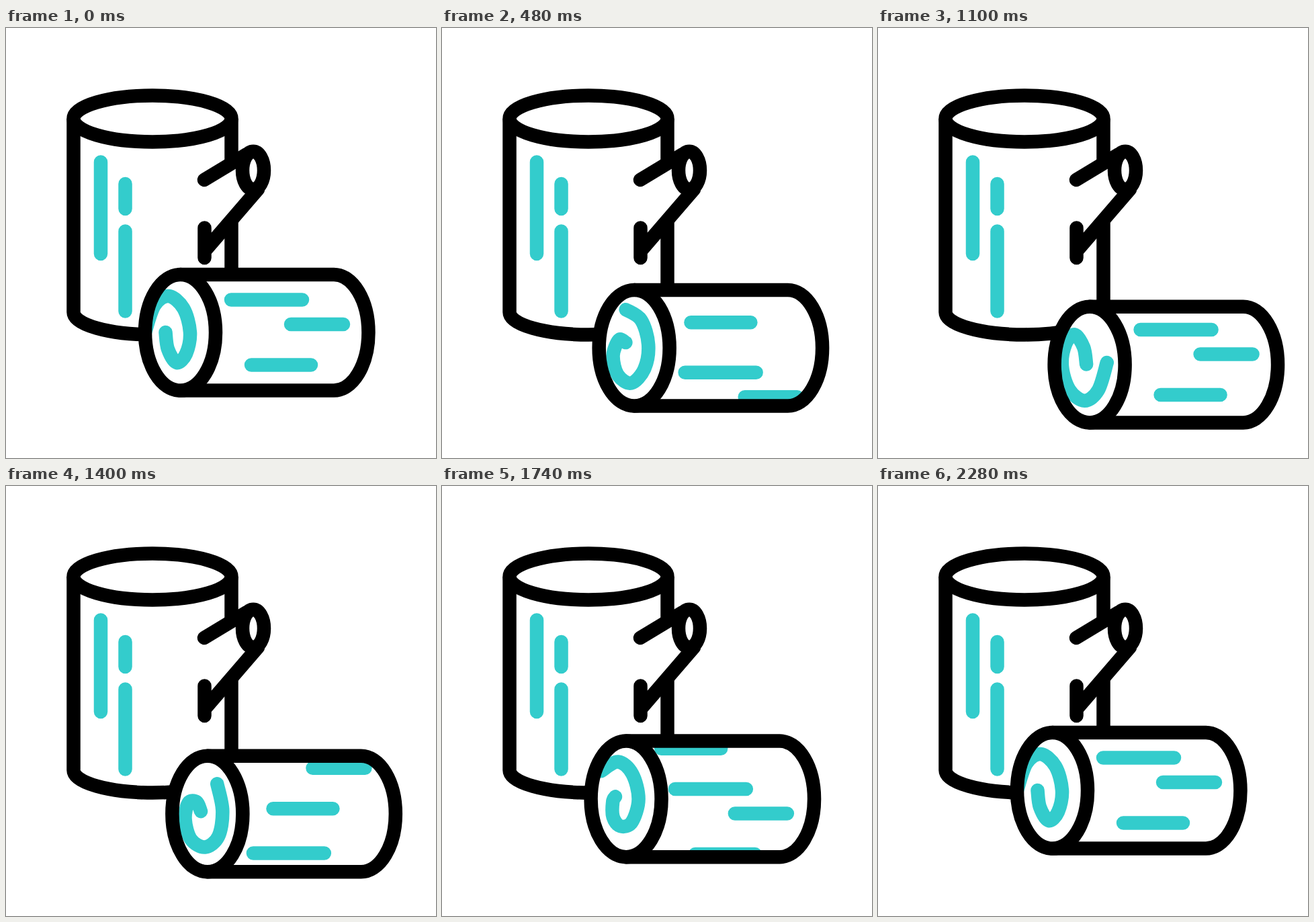
An HTML page that plays this animation: 640x640 px, repeating every 3000 ms.

```html
<!DOCTYPE html>
<html lang="en">
<head>
<meta charset="utf-8">
<title>Rolling log</title>
<style>
  html, body { margin: 0; width: 100%; height: 100%; overflow: hidden; background: #fff; }
  svg { display: block; width: 100vw; height: 100vh; }
  .ink { fill: none; stroke: #000; stroke-width: 20.5; stroke-linejoin: round; }
  .face { fill: #fff; }
  .bark { fill: none; stroke: #33cccc; stroke-width: 20.5; stroke-linecap: round; stroke-linejoin: round; }
  .round { stroke-linecap: round; }
</style>
</head>
<body>
<svg viewBox="0 0 640 640">
  <defs>
    <path id="body" d="M259.5 367H488A51.5 86.3 0 0 1 488 539.6H259.5Z"/>
    <ellipse id="end" cx="259.5" cy="453.3" rx="52.5" ry="86.3"/>
    <clipPath id="bodyClip"><use href="#body"/></clipPath>
    <clipPath id="endClip"><use href="#end"/></clipPath>
    <path id="marks" d="M335 404.5H441M424 441H502M365 501.5H454"/>
  </defs>

  <g class="ink">
    <path d="M335.5 135V200M335.5 286V423"/>
    <path d="M100.5 135V423A117.5 33.5 0 0 0 335.5 423"/>
    <ellipse cx="218" cy="135" rx="117.5" ry="34.5"/>
    <path class="round" d="M295 226L358 188M295.5 297.5V342M297 330.5L375 240"/>
    <ellipse class="face" cx="368" cy="212" rx="16" ry="28.2"/>
  </g>
  <path class="bark" d="M141 199.5V336M177.5 232V269M177.5 302.5V421.5"/>

  <g id="log">
    <use href="#body" class="face"/>
    <g class="bark" clip-path="url(#bodyClip)">
      <use id="lower" href="#marks"/>
      <use id="upper" href="#marks"/>
    </g>
    <use href="#body" class="ink"/>
    <use href="#end" class="face"/>
    <g clip-path="url(#endClip)"><path id="spiral" class="bark"/></g>
    <use href="#end" class="ink"/>
  </g>
</svg>
<script>
const LOOP = 3000, OUT = 1000, TURN = 1020, BACK = 1080;
const el = id => document.getElementById(id);

// Spiral from inner to outer end, around its centre: at rest and after a quarter turn
const CENTER = [246, 453];
const REST = [[-8.5, 0], [-5, 25], [8, 45], [22, 32], [28, 0], [18, -36], [-4, -54], [-25, -40], [-39, 0]];
const QUARTER = [[1.5, -8], [-9, -14], [-19, 8], [-13, 38], [6.5, 53], [27, 35], [35, 0], [26, -38], [4.5, -57]];

function ease(s) {
  s = Math.min(Math.max(s, 0), 1);
  return s * s * (3 - 2 * s);
}

// Each point circles on its own ellipse; the inner coil tightens on the diagonals
function spiralPoints(angle) {
  const c = Math.cos(angle), s = Math.sin(angle), diagonal = (2 * s * c) ** 2;
  return REST.map((a, i) => {
    const size = 1 - 0.45 * diagonal * Math.max(0, 1 - i / 5);
    return a.map((v, j) => CENTER[j] + size * (v * c + QUARTER[i][j] * s));
  });
}

// Smooth path through the points
function curve(pts) {
  const at = k => pts[Math.min(Math.max(k, 0), pts.length - 1)];
  const toward = (p, a, b) => p.map((v, j) => v + (b[j] - a[j]) / 6);
  let d = 'M' + pts[0];
  for (let k = 0; k < pts.length - 1; k++) {
    const p = at(k), q = at(k + 1);
    d += 'C' + [toward(p, at(k - 1), q), toward(q, at(k + 2), p), q].join(' ');
  }
  return d;
}

const move = (id, x, y) => el(id).setAttribute('transform', `translate(${x} ${y})`);

function draw() {
  const t = performance.now() % LOOP;
  const p = ease(t / OUT) - ease((t - TURN) / BACK), left = 1 - p;
  move('log', 56.5 * p, 48.6 * p);

  // Two sets of bark marks follow each other around the log
  if (t < TURN) {
    move('lower', 0, 181 * p);
    move('upper', -76 * left ** 2, -163 * left);
  } else {
    move('lower', -10.5 * p, 157 * p ** 1.13);
    move('upper', -97 * left ** 2, -(215 - 66 * left) * left);
  }
  el('spiral').setAttribute('d', curve(spiralPoints(Math.PI * p)));
  requestAnimationFrame(draw);
}
draw();
</script>
</body>
</html>
```
